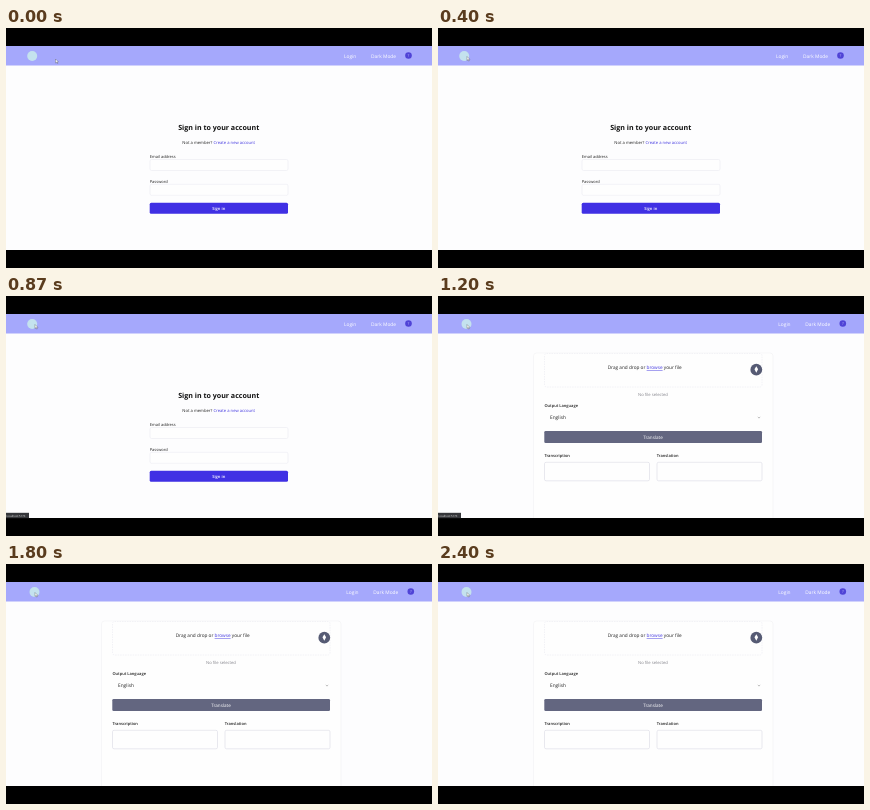
Recreate the animation shown at these times as an HTML page. Size 426 by 240 pixels, loop 2.47 s.

```html
<!DOCTYPE html>
<html lang="en">
<head>
<meta charset="utf-8">
<title>Sign in and translate</title>
<style>
  html, body { margin: 0; height: 100%; overflow: hidden; background: #000; }
  svg { display: block; width: 100vw; height: 100vh; }
  text { font: 4px "Open Sans", "Noto Sans", sans-serif; fill: #222; text-rendering: geometricPrecision; }
  .mid { text-anchor: middle; }
  .label { font-weight: 600; }
  .nav text { font-size: 4.85px; fill: #fff; }
  .link { fill: #4338e0; }
  .field { fill: #fefefe; stroke: #e6e6ee; stroke-width: .5; }
  .dash { stroke-dasharray: 1.5 1; }
</style>
</head>
<body>
<svg viewBox="0 0 426 240">
  <rect width="426" height="240"/>
  <rect y="18" width="426" height="204" fill="#fdfdfe"/>
  <rect y="18" width="426" height="19.5" fill="#a5a8fc"/>

  <g class="nav" id="nav">
    <circle cx="26.2" cy="28" r="5" fill="#c4e2ee"/>
    <text x="338" y="29.6">Login</text>
    <text x="365" y="29.6">Dark Mode</text>
    <circle cx="402.5" cy="27.5" r="3.3" fill="#4f43d6"/>
    <text class="mid" x="402.5" y="29.1" style="font-size:4.2px;fill:#b9b8fb">?</text>
  </g>

  <g id="signIn">
    <text class="mid" x="212.7" y="102.3" style="font-size:7.1px;font-weight:700;fill:#111">Sign in to your account</text>
    <text class="mid" x="212.7" y="116.3" style="font-size:4.16px">Not a member? <tspan class="link">Create a new account</tspan></text>
    <text x="143.7" y="130">Email address</text>
    <rect class="field" x="144" y="131.5" width="138" height="11" rx="1.5"/>
    <text x="143.7" y="154.6">Password</text>
    <rect class="field" x="144" y="156.3" width="138" height="11" rx="1.5"/>
    <rect x="143.7" y="174.8" width="138.3" height="11" rx="1.5" fill="#4030e4"/>
    <text class="mid label" x="212.7" y="181.9" style="font-size:4.1px;fill:#fff">Sign in</text>
  </g>

  <g id="translate">
    <path d="M95.5 222V60q0-3 3-3H332q3 0 3 3V222" fill="#fefefe" stroke="#f1f1f4" stroke-width=".6"/>
    <rect class="field dash" x="106.5" y="57.5" width="217.5" height="33.5" rx="2"/>
    <text x="169.7" y="73.4" style="font-size:4.71px">Drag and drop or <tspan class="link" text-decoration="underline">browse</tspan> your file</text>
    <circle cx="318.3" cy="73.7" r="5.9" fill="#565b74"/>
    <path d="M318.3 70.3l1.8 2.9-1.8 3.6-1.8-3.6z" fill="#fff"/>
    <text class="mid" x="215" y="100" style="font-size:4.2px;fill:#85858c">No file selected</text>
    <text class="label" x="106.4" y="111.3">Output Language</text>
    <text x="112" y="123" style="font-size:4.8px">English</text>
    <path d="M319.8 121l1.2 1.1 1.2-1.1" fill="none" stroke="#777" stroke-width=".5"/>
    <rect x="106.3" y="135" width="217.7" height="12" rx="1.3" fill="#636680"/>
    <text class="mid" x="215" y="142.7" style="font-size:4.6px;fill:#fff">Translate</text>
    <text class="label" x="106.4" y="161.3">Transcription</text>
    <text class="label" x="218.8" y="161.3">Translation</text>
    <rect class="field" x="106.5" y="166.3" width="105" height="18.5" rx="1.5" style="stroke:#d2d2de"/>
    <rect class="field" x="219" y="166.3" width="105" height="18.5" rx="1.5" style="stroke:#d2d2de"/>
  </g>

  <g id="status">
    <rect y="216.8" width="23" height="5.4" fill="#35363a"/>
    <text x=".6" y="220.6" style="font-size:2.8px;fill:#ddd">localhost:5173</text>
  </g>

  <path id="cursor" d="M0 0v4l1-.9.7 1.5.6-.3-.7-1.4h1.3z" fill="#fff" stroke="#333" stroke-width=".3"/>
</svg>
<script>
const LOOP = 2470, PAGE_SWITCH = 1000, ARRIVE = 350;
const [nav, signIn, translate, status_, cursor] =
  ["nav", "signIn", "translate", "status", "cursor"].map(id => document.getElementById(id));
const show = (el, on) => el.style.display = on ? "" : "none";

function draw(now) {
  const t = now % LOOP;
  const second = t >= PAGE_SWITCH;
  show(signIn, !second);
  show(translate, second);
  show(status_, t >= 600 && t < 1470);
  nav.setAttribute("transform", `translate(${second ? 2.3 : 0})`);

  const p = Math.min(t / ARRIVE, 1), ease = p * p * (3 - 2 * p);
  cursor.setAttribute("transform", `translate(${49.5 - 20.5 * ease} ${31 - 2.5 * ease})`);
  requestAnimationFrame(() => draw(performance.now()));
}
draw(performance.now());
</script>
</body>
</html>
```
